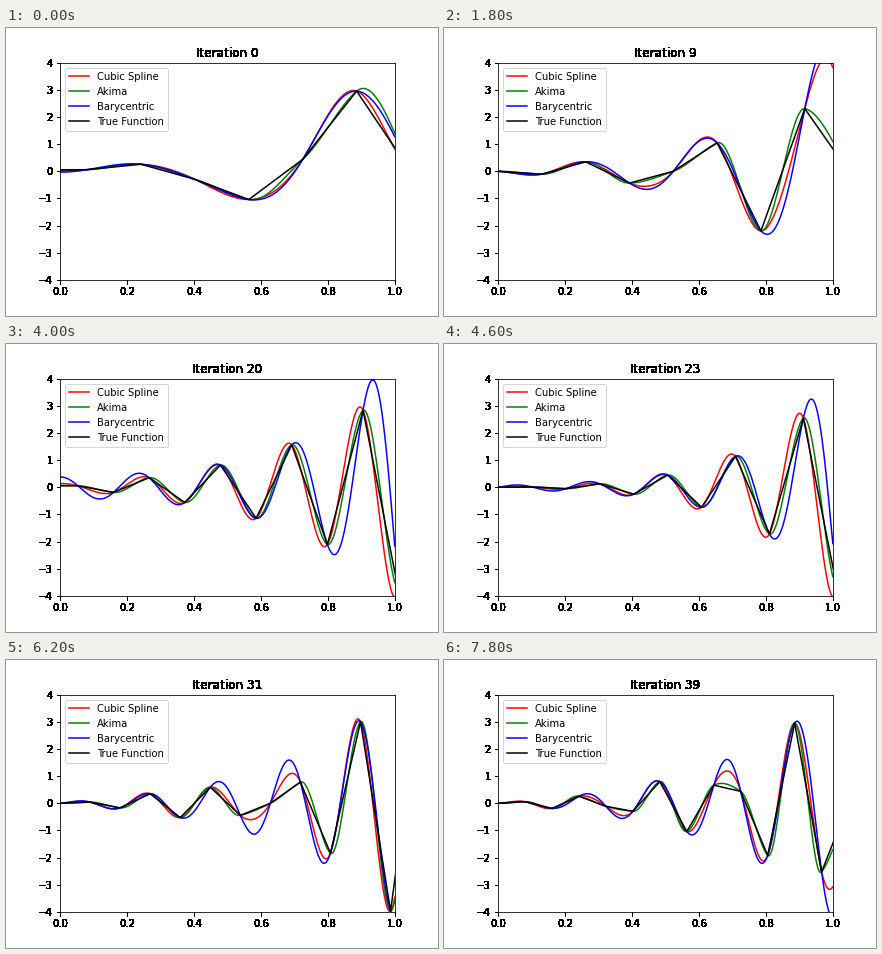
Animation of 432x288 px, one loop 8 s. Source, as a matplotlib script:

```python
import math

import numpy as np
import matplotlib.pyplot as plt
from matplotlib.animation import FuncAnimation

FRAMES = 40
FIRST_COUNT = 40
GRID = np.linspace(0, 1, 500)


def func(x):
    return np.sin(30 * x) * np.tan(x) * np.exp(x)


def hermite(x, y, slope, t):
    """Piecewise cubic through (x, y) with the given node slopes."""
    h = x[1] - x[0]
    i = np.clip(np.searchsorted(x, t, side="right") - 1, 0, len(x) - 2)
    u = (t - x[i]) / h
    return ((1 + 2 * u) * (1 - u) ** 2 * y[i]
            + u * (1 - u) ** 2 * h * slope[i]
            + u * u * (3 - 2 * u) * y[i + 1]
            + u * u * (u - 1) * h * slope[i + 1])


def cubic_spline(x, y, t):
    """Not-a-knot spline on evenly spaced nodes."""
    n = len(x)
    m = np.diff(y) / (x[1] - x[0])
    a = 4 * np.eye(n) + np.eye(n, k=1) + np.eye(n, k=-1)
    a[0, :2] = 1, 2
    a[-1, -2:] = 2, 1
    rhs = np.empty(n)
    rhs[1:-1] = 3 * (m[1:] + m[:-1])
    rhs[0] = (5 * m[0] + m[1]) / 2
    rhs[-1] = (5 * m[-1] + m[-2]) / 2
    return hermite(x, y, np.linalg.solve(a, rhs), t)


def akima(x, y, t):
    m = np.diff(y) / (x[1] - x[0])
    lo = 2 * m[0] - m[1]
    hi = 2 * m[-1] - m[-2]
    m = np.concatenate([[2 * lo - m[0], lo], m, [hi, 2 * hi - m[-1]]])
    dm = np.abs(np.diff(m))
    left, right = dm[2:], dm[:-2]
    total = left + right
    flat = total <= 1e-9 * total.max()
    blend = (left * m[1:-2] + right * m[2:-1]) / np.where(flat, 1, total)
    return hermite(x, y, np.where(flat, (m[3:] + m[:-3]) / 2, blend), t)


def barycentric(x, y, t):
    n = len(x) - 1
    w = np.array([(-1.0) ** k * math.comb(n, k) for k in range(n + 1)])
    d = t[:, None] - x
    d[np.abs(d) < 1e-12] = 1e-12
    q = w / d
    return q @ y / q.sum(axis=1)


def harden(img, dpi):
    """Turn every touched pixel solid black."""
    out = np.zeros_like(img)
    out[..., 3] = img[..., 3] > 0.02
    return out, 0, 0


fig, ax = plt.subplots(figsize=(6, 4), dpi=72, facecolor="white")
fig.subplots_adjust(left=0.125, right=0.9, bottom=0.125, top=0.88)
ax.set(xlim=(0, 1), ylim=(-4, 4), yticks=range(-4, 5))
title = ax.set_title("Iteration 0")

red, = ax.plot([], [], "r", label="Cubic Spline")
green, = ax.plot([], [], "g", label="Akima")
blue, = ax.plot([], [], "b", label="Barycentric")
black, = ax.plot([], [], "k", label="True Function")
ax.legend(loc="upper left")

for part in (ax.xaxis, ax.yaxis, title):
    part.set_agg_filter(harden)


def update(i):
    x = np.linspace(-np.pi, np.pi, FIRST_COUNT + i)
    y = func(x)
    red.set_data(GRID, cubic_spline(x, y, GRID))
    green.set_data(GRID, akima(x, y, GRID))
    blue.set_data(GRID, barycentric(x, y, GRID))
    black.set_data(x, y)
    title.set_text(f"Iteration {i}")
    return red, green, blue, black, title


anim = FuncAnimation(fig, update, frames=FRAMES, interval=200,
                     repeat=True, repeat_delay=0)
plt.show()
```
